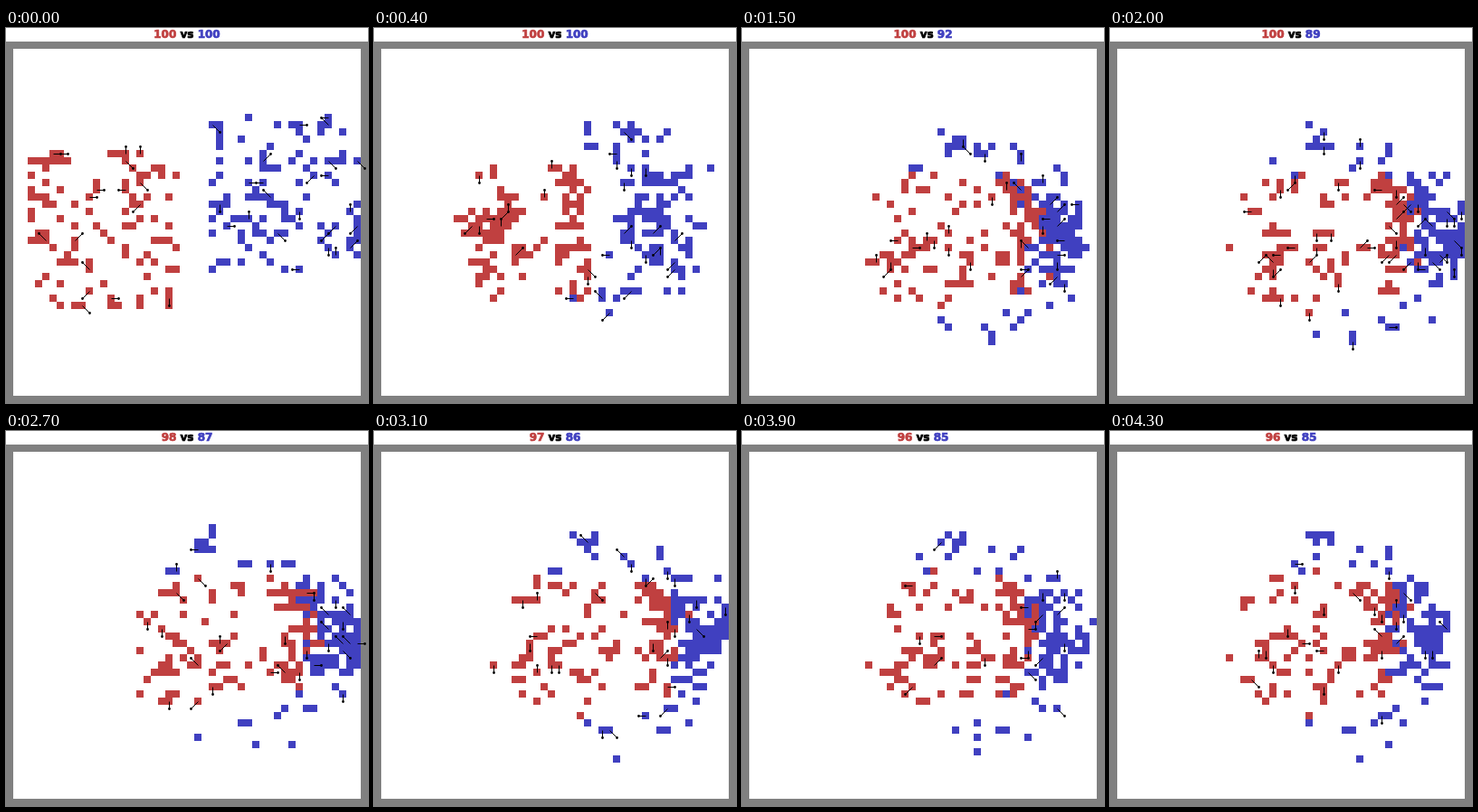
An HTML page for the animation above (4400 ms loop, 400x415 px).

```html
<!DOCTYPE html>
<html lang="en">
<head>
<meta charset="utf-8">
<title>Grid battle</title>
<style>
html, body { margin: 0; width: 100%; height: 100%; overflow: hidden; background: #fff; }
svg { display: block; }
text { font: bold 12px "DejaVu Sans", sans-serif; text-anchor: middle; stroke-width: .7px; }
.red { fill: #c04040; }
.blue { fill: #4040c0; }
tspan.red { stroke: #c04040; }
tspan.blue { stroke: #4040c0; }
.vs { fill: #000; stroke: #000; }
.cells { shape-rendering: crispEdges; }
.pins { stroke: #000; fill: none; }
.tips { stroke-width: 2.8; stroke-linecap: round; }
</style>
</head>
<body>
<svg width="400" height="415" viewBox="0 0 400 415">
  <text x="200" y="10.5"><tspan class="red" id="redCount">100</tspan><tspan class="vs"> vs </tspan><tspan class="blue" id="blueCount">100</tspan></text>
  <path fill="#808080" fill-rule="evenodd" d="M0 15h400v400h-400zM8 23h384v384h-384z"/>
  <path class="cells red" id="redCells"/>
  <path class="cells blue" id="blueCells"/>
  <path class="pins" id="pins"/>
  <path class="pins tips" id="tips"/>
</svg>
<script>
const CELL = 8, TOP = 15, STEP = 100, STEPS = 44, SIZE = 100, CHARGE = 8;
const $ = id => document.getElementById(id);
const limit = (v, lo, hi) => Math.max(lo, Math.min(hi, v));
const inside = v => limit(Math.round(v), 1, 48);

function ease(step, from, length) {
  const t = limit((step - from) / length, 0, 1);
  return t * t * (3 - 2 * t);
}

function seeded(seed) {
  return () => {
    seed = (seed + 0x6d2b79f5) | 0;
    let t = Math.imul(seed ^ (seed >>> 15), 1 | seed);
    t = (t + Math.imul(t ^ (t >>> 7), 61 | t)) ^ t;
    return ((t ^ (t >>> 14)) >>> 0) / 4294967296;
  };
}

// The battle line is an arc that red pushes outward and blue later pushes back.
const lineRadius = step => 10.5 + 5 * ease(step, 8, 12) - 2.5 * ease(step, 27, 16);
const onArc = (angle, rx, ry) => [30 + rx * Math.cos(angle), 27 + ry * Math.sin(angle)];

// Red's right side forms the front; the others mill about in a disc behind it.
function redGoal(unit, step) {
  if (unit.x >= 16) return onArc(.7 * unit.v - .1, lineRadius(step) - 5 + unit.depth, 11);
  return [25.5 + unit.discX * 9, 27 + unit.discY * 9.5];
}

// Blue bends around red in a crescent, densest on the right.
function blueGoal(unit, step) {
  const angle = .6 * unit.v + 1.3 * unit.v ** 3 - .15;
  return onArc(angle, lineRadius(step) + 1.2 * unit.depth, 13 + unit.depth);
}

const TEAMS = [
  {
    name: "red", left: 3, top: 15, seed: 11, goal: redGoal,
    losses: step => limit(Math.floor((step - 16) / 5), 0, 4)
  },
  {
    name: "blue", left: 28, top: 10, seed: 29, goal: blueGoal,
    losses: step => Math.round(14.6 * (1 - (1 - limit((step - 6) / 29, 0, 1)) ** 2))
  }
];

function muster(team) {
  const rand = seeded(team.seed), used = new Set();
  team.units = [];
  while (team.units.length < SIZE) {
    const x = team.left + Math.floor(rand() * 21);
    const y = team.top + Math.floor(rand() * 22);
    if (used.has(x + 50 * y)) continue;
    used.add(x + 50 * y);
    const angle = rand() * 2 * Math.PI, reach = Math.sqrt(rand());
    team.units.push({
      x, y,
      v: (y - team.top - 10.5) / 10.5,
      discX: Math.cos(angle) * reach,
      discY: Math.sin(angle) * reach,
      depth: (rand() + rand() + rand() - 1.5) * 3,
      phase: rand() * 6.28,
      pace: .4 + rand() * .6
    });
  }
}

function place(team, unit, step) {
  const [gx, gy] = team.goal(unit, step);
  const f = Math.min(1, step / CHARGE);
  const turn = step * unit.pace + unit.phase;
  return [
    inside(unit.x + (gx - unit.x) * f + 1.2 * f * Math.sin(turn)),
    inside(unit.y + (gy - unit.y) * f + 1.2 * f * Math.cos(turn * 1.3))
  ];
}

// Nearest unoccupied cell, so no two units share a square.
function settle([x, y], taken) {
  let best = [x, y], near = Infinity;
  for (let r = 0; r < 7 && near > r * r; r++)
    for (let dx = -r; dx <= r; dx++)
      for (let dy = -r; dy <= r; dy++) {
        const cx = x + dx, cy = y + dy, d = dx * dx + dy * dy;
        if (cx < 1 || cx > 48 || cy < 1 || cy > 48 || d >= near) continue;
        if (!taken.has(cx + 50 * cy)) { best = [cx, cy]; near = d; }
      }
  taken.add(best[0] + 50 * best[1]);
  return best;
}

function draw(step) {
  const taken = new Set(), rand = seeded(1000 + step * 77);
  let pins = "", tips = "";
  for (const team of TEAMS) {
    const alive = SIZE - team.losses(step);
    let cells = "";
    for (const unit of team.units.slice(0, alive)) {
      const [cx, cy] = settle(place(team, unit, step), taken);
      const x = cx * CELL, y = TOP + cy * CELL;
      cells += `M${x} ${y}h8v8h-8z`;
      if (rand() > .18) continue;
      // Pins point any of eight ways, most often down.
      const down = step && rand() < .35;
      const angle = (down ? 2 : Math.floor(rand() * 8)) * Math.PI / 4;
      const dx = CELL * Math.round(Math.cos(angle)), dy = CELL * Math.round(Math.sin(angle));
      pins += `M${x + 4.5} ${y + 4.5}l${dx} ${dy}`;
      tips += `M${x + 4.5 + dx} ${y + 4.5 + dy}h.01`;
    }
    $(team.name + "Cells").setAttribute("d", cells);
    $(team.name + "Count").textContent = alive;
  }
  $("pins").setAttribute("d", pins);
  $("tips").setAttribute("d", tips);
}

TEAMS.forEach(muster);
const start = performance.now();
let shown = -1;
function tick() {
  const step = Math.floor((performance.now() - start) / STEP) % STEPS;
  if (step !== shown) draw(shown = step);
  requestAnimationFrame(tick);
}
tick();
</script>
</body>
</html>
```
